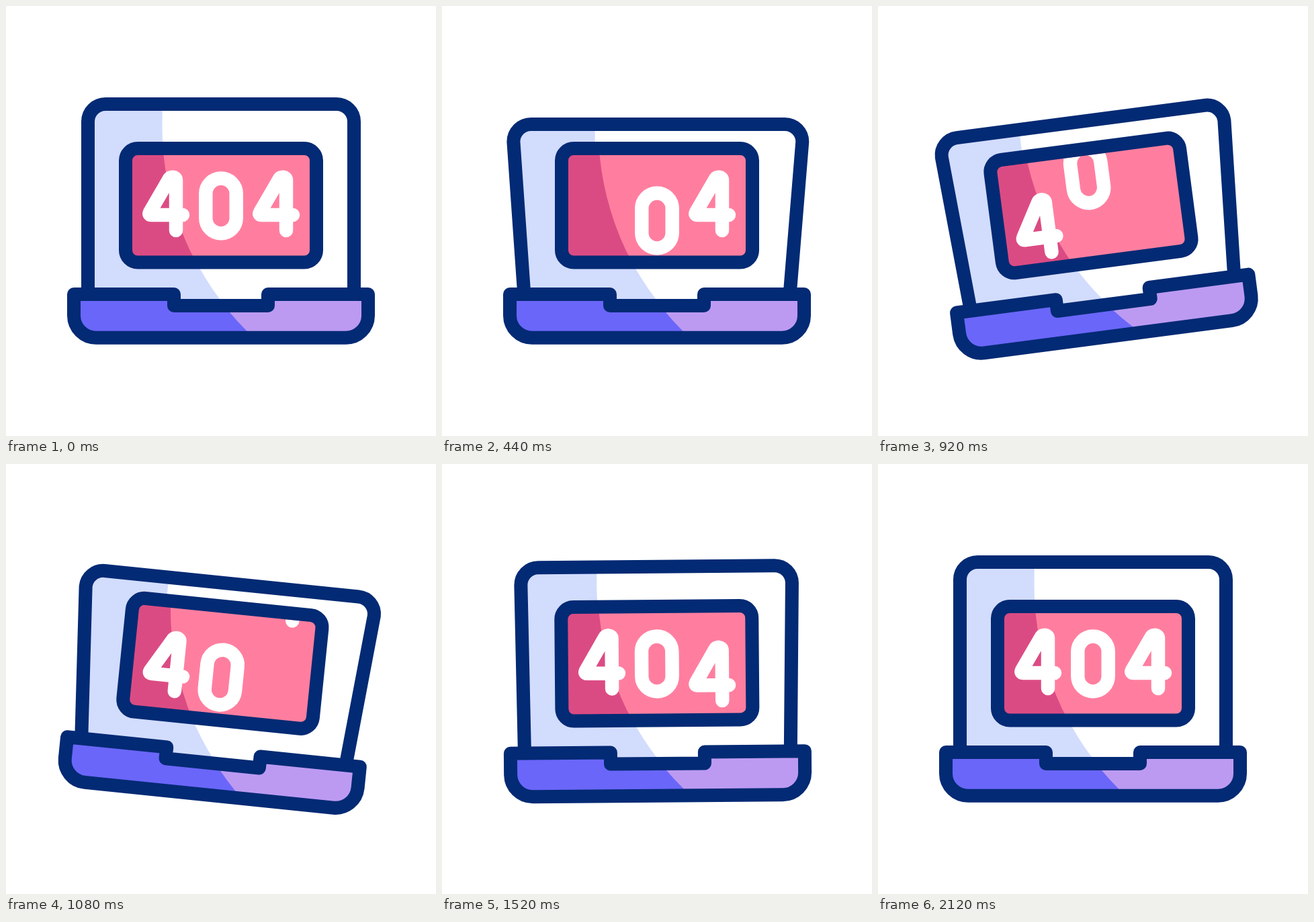
An HTML page with a canvas for the animation above (2400 ms loop, 640 by 640 pixels).

```html
<!DOCTYPE html>
<html lang="en">
<head>
<meta charset="utf-8">
<title>404 laptop</title>
<style>
  html, body { margin: 0; width: 100%; height: 100%; overflow: hidden; background: #fff; }
  canvas { display: block; width: 100vw; height: 100vh; }
</style>
</head>
<body>
<canvas id="stage" width="640" height="640"></canvas>
<script>
const ctx = document.getElementById('stage').getContext('2d');
const LOOP = 2400, STEP = 40, LAST = 2120;
const NAVY = '#032a74', WHITE = '#ffffff';

// [time, value] pairs, eased in and out between neighbours
const TILT = [[550, 0], [850, -10.2], [1130, 7.3], [1372, -3.4], [1565, 0]];
const SQUASH = [[0, 0], [370, 33], [745, 0], [1010, 34], [1420, 0], [1765, 33], [2120, 0]];
const ENTER = [[405, -155], [885, 24.5], [1255, 0]];
const DELAYS = [0, 240, 520];

const smooth = u => u * u * (3 - 2 * u);

function track(keys, t) {
  if (t <= keys[0][0]) return keys[0][1];
  for (let i = 1; i < keys.length; i++) {
    const [t0, a] = keys[i - 1], [t1, b] = keys[i];
    if (t < t1) return a + (b - a) * smooth((t - t0) / (t1 - t0));
  }
  return keys[keys.length - 1][1];
}

// A digit drops out below, then comes in from above and settles
function drop(t) {
  if (t < 85) return 0;
  if (t < 405) return ((t - 85) * 0.0408) ** 2;
  return track(ENTER, t);
}

function stroke(path, color, width) {
  ctx.strokeStyle = color;
  ctx.lineWidth = width;
  ctx.stroke(path);
}

function fill(path, color) {
  ctx.fillStyle = color;
  ctx.fill(path);
}

function clipped(path, draw) {
  ctx.save();
  ctx.clip(path);
  draw();
  ctx.restore();
}

function roundRect(x, y, w, h, r) {
  const p = new Path2D();
  p.roundRect(x, y, w, h, r);
  return p;
}

const base = new Path2D(
  'M101 429H250V446H390V429H539V461A33 33 0 0 1 506 493.7H134A33 33 0 0 1 101 461Z');
const pane = roundRect(178, 212, 284, 169.5, 18);
const paneInside = roundRect(188, 222, 264, 149.5, 8);
const four = new Path2D(
  'M253 334V259C253 254 245 253 242.5 258L214 307Q212 311 216 311H263');
const zero = roundRect(297.3, 256.5, 45.4, 82, 22.7);
const light = new Path2D();
light.arc(662.2, 180, 429.7, 0, Math.PI * 2);

function twoTone(path, dark, pale) {
  fill(path, dark);
  clipped(path, () => fill(light, pale));
}

function lidPath(s) {
  const l = 122 - s * 0.52, r = 518 + s * 0.61, top = 146 + s, k = 11.6;
  const p = new Path2D();
  p.moveTo(122, 446);
  p.lineTo(122, 425);
  p.lineTo(l, top + 26);
  p.bezierCurveTo(l, top + k, l + k, top, l + 26, top);
  p.lineTo(r - 26, top);
  p.bezierCurveTo(r - k, top, r, top + k, r, top + 26);
  p.lineTo(518, 425);
  p.lineTo(518, 446);
  return p;
}

function drawLid(s) {
  const lid = lidPath(s), bend = s / 31;
  fill(lid, WHITE);
  clipped(lid, () => {
    const x = 233 - 5 * bend;
    const shade = new Path2D();
    shade.moveTo(60, 100);
    shade.lineTo(x, 100);
    shade.lineTo(x - 0.5, 180 + s * 0.6);
    shade.bezierCurveTo(232.5 - 3 * bend, 272.3, 263, 362, 318, 436);
    shade.lineTo(330, 450);
    shade.lineTo(60, 450);
    fill(shade, '#d2dcfd');
  });
  stroke(lid, NAVY, 20);
}

function drawDigits(t) {
  const shapes = [[four, 0], [zero, 0], [four, 164]];
  shapes.forEach(([shape, x], i) => {
    ctx.save();
    ctx.translate(x, drop(t - DELAYS[i]));
    stroke(shape, WHITE, 20.5);
    ctx.restore();
  });
}

function draw(t) {
  ctx.setTransform(1, 0, 0, 1, 0, 0);
  ctx.fillStyle = WHITE;
  ctx.fillRect(0, 0, 640, 640);
  ctx.lineCap = ctx.lineJoin = 'round';

  ctx.translate(320, 320);
  ctx.rotate(track(TILT, t) * Math.PI / 180);
  ctx.translate(-320, -320);

  drawLid(track(SQUASH, t));
  twoTone(base, '#6a66f9', '#bc9af2');
  stroke(base, NAVY, 20);
  twoTone(pane, '#db4b83', '#ff7e9f');
  clipped(paneInside, () => drawDigits(t));
  stroke(pane, NAVY, 20);
}

const start = performance.now();
function tick() {
  const t = (performance.now() - start) % LOOP;
  draw(Math.min(Math.floor(t / STEP) * STEP, LAST));
  requestAnimationFrame(tick);
}
tick();
</script>
</body>
</html>
```
